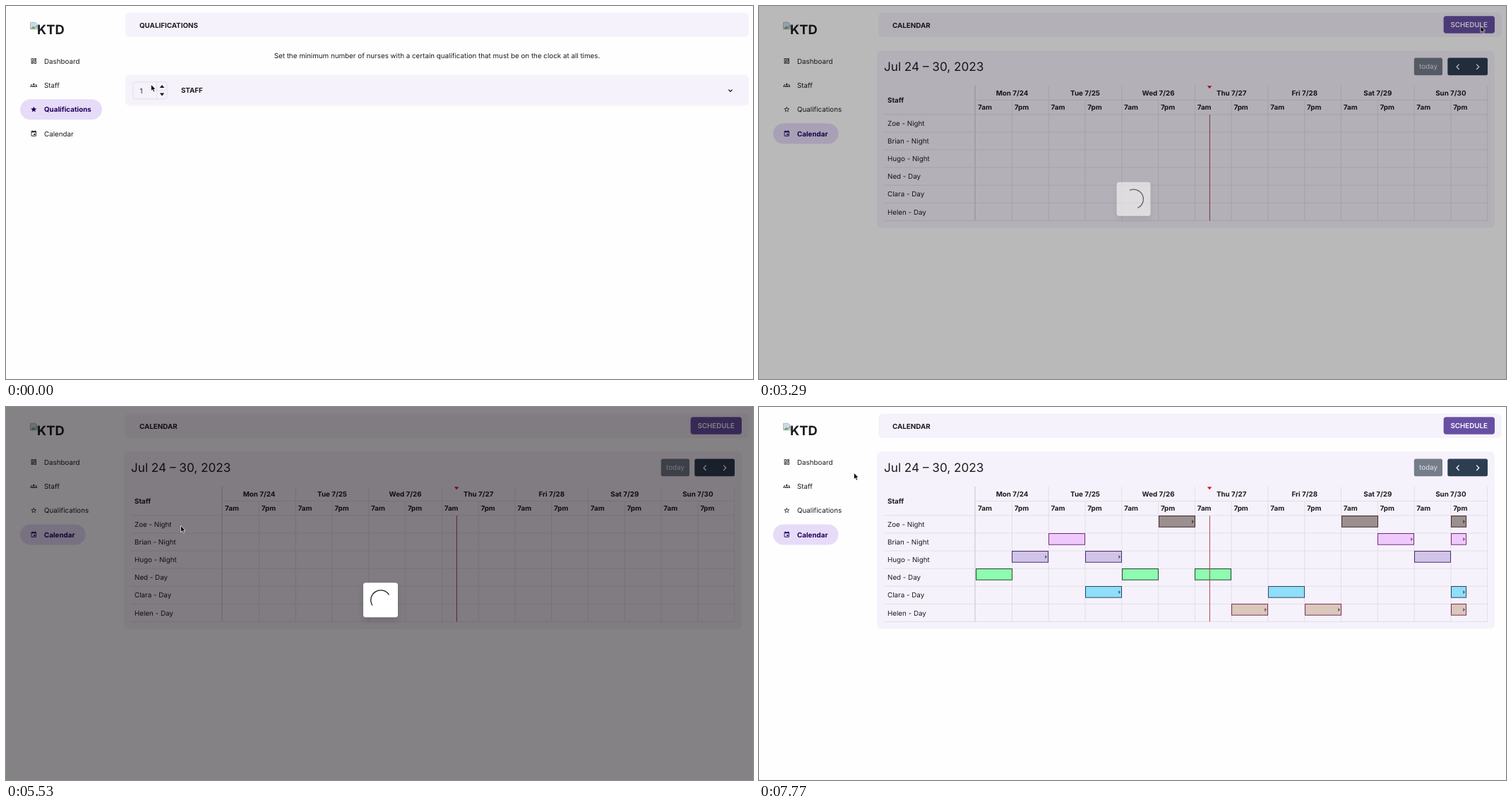
Write an HTML page that moves like this. It is 1058 by 529 pixels and loops after 8 s.

```html
<!DOCTYPE html>
<html lang="en">
<head>
<meta charset="utf-8">
<title>Staff calendar</title>
<style>
  html, body { margin: 0; width: 100%; height: 100%; overflow: hidden; background: #fffeff; }
  svg { display: block; width: 1058px; height: 529px; }
  text { font: 9.8px Inter, sans-serif; fill: #1c1b1f; white-space: pre; text-rendering: geometricPrecision; }
  .bold { font-weight: 700; }
  .semi { font-weight: 600; }
  .mid { text-anchor: middle; }
  .title { font-size: 17.14px; }
  .logo { font-size: 18.4px; font-weight: 700; }
  .active text, .active path { fill: #21005d; }
  .panel { fill: #f6f2fb; }
  .line { stroke: #dddae1; stroke-width: .8; fill: none; }
  #box { filter: drop-shadow(0 4px 4px rgba(0, 0, 0, .13)); }
</style>
</head>
<body>
<svg id="stage" viewBox="0 0 1058 529"></svg>
<script>
const LEFT = 306.7, HALF = 51.78, TOP = 153.8, ROW = 25.1;
const STEP = 70, LOOP = 8000;

const text = (x, y, s, cls = '', extra = '') => `<text x="${x}" y="${y}" class="${cls}" ${extra}>${s}</text>`;
const rect = (x, y, w, h, r, attrs) => `<rect x="${x}" y="${y}" width="${w}" height="${h}" rx="${r}" ${attrs}/>`;
const path = (d, attrs = '') => `<path d="${d}" ${attrs}/>`;
const group = (id, body) => `<g id="${id}">${body}</g>`;
const range = n => [...Array(n).keys()];

const icons = {
  board: 'M19 5v2h-4V5h4M9 5v6H5V5h4m10 8v6h-4v-6h4M9 17v2H5v-2h4M21 3h-8v6h8V3zM11 3H3v10h8V3zm10 8h-8v10h8V11zm-10 4H3v6h8v-6z',
  people: 'M12 6a3 3 0 0 1 0 6a3 3 0 0 1 0-6zM6 18v-1.6c0-4 12-4 12 0V18zm2.3-2h7.4c-1-1.3-6.4-1.3-7.4 0zM4 9a2 2 0 0 1 0 4a2 2 0 0 1 0-4zM20 9a2 2 0 0 1 0 4a2 2 0 0 1 0-4zM0 18v-1.6c0-2 2.5-2.6 5-2.3q-.6 1-.6 3.9zM24 18v-1.6c0-2-2.5-2.6-5-2.3q.6 1 .6 3.9z',
  star: 'M12 17.27 18.18 21l-1.64-7.03L22 9.24l-7.19-.61L12 2 9.19 8.63 2 9.24l5.46 4.73L5.82 21z',
  starHole: 'M12 15.4l-3.76 2.27 1-4.28-3.32-2.88 4.38-.38L12 6.1l1.71 4.04 4.38.38-3.32 2.88 1 4.28z',
  event: 'M17 12h-5v5h5v-5zM16 1v2H8V1H6v2H5c-1.1 0-2 .9-2 2v14c0 1.1.9 2 2 2h14c1.1 0 2-.9 2-2V5c0-1.1-.9-2-2-2h-1V1h-2zm3 18H5V8h14v11z'
};

function navItem(y, label, icon, pill) {
  const back = pill ? rect(20, y - 14.5, pill, 29, 14.5, 'fill="#e6dcf8"') : '';
  return `<g class="${pill ? 'active' : ''}">${back}` +
    path(icon, `fill="#1c1b1f" fill-rule="evenodd" transform="translate(34.4 ${y - 4.9}) scale(.408)"`) +
    text(54, y + 3.5, label, pill ? 'bold' : '') + '</g>';
}

function sidebar() {
  return path('M34.5 23.2h7l3 3v6.6h-10z', 'fill="#cbd9f0" stroke="#a9a9a9" stroke-width=".8"') +
    path('M35 32.4l3.6-4 2.2 2 3.2-3.4v2l-4 3.4z', 'fill="#6fa85c"') +
    text(44, 40.3, 'KTD', 'logo') +
    navItem(78, 'Dashboard', icons.board) + navItem(112.3, 'Staff', icons.people);
}

function qualifications() {
  return navItem(146.7, 'Qualifications', icons.star, 116) + navItem(181, 'Calendar', icons.event) +
    text(189, 30.8, 'QUALIFICATIONS', 'bold') +
    text(610.5, 74.1, 'Set the minimum number of nurses with a certain qualification that must be on the clock at all times.', 'mid') +
    rect(169, 97.5, 883, 44, 6, 'class="panel"') +
    rect(180, 107.8, 48, 24, 3, 'class="line"') +
    path('M213.5 108v24M213.5 120h14.5', 'class="line"') +
    text(189.5, 123.5, '1') +
    path('M217.7 116l3.3-4 3.3 4zM217.7 123.6l3.3 4 3.3-4z', 'fill="#1c1b1f"') +
    text(248, 123.3, 'STAFF', 'bold') +
    path('M1023.3 118.6l2.7 2.7 2.7-2.7', 'fill="none" stroke="#1c1b1f" stroke-width="1.3"');
}

function calendarHeader() {
  return navItem(146.7, 'Qualifications', icons.star + icons.starHole) +
    navItem(181, 'Calendar', icons.event, 92.5) +
    text(189, 30.8, 'CALENDAR', 'bold') +
    rect(969.6, 14.2, 72.4, 24.5, 3.7, 'fill="#6750a4"') +
    text(1005.7, 30, 'SCHEDULE', 'semi mid', 'style="fill:#fff"');
}

const staff = [
  { name: 'Zoe - Night', fill: '#9b8f90', edge: '#44292f', slots: [5, 10, 13], arrows: [5, 13] },
  { name: 'Brian - Night', fill: '#f0c9fc', edge: '#79287f', slots: [2, 11, 13], arrows: [11, 13] },
  { name: 'Hugo - Night', fill: '#d1c4e9', edge: '#4d2a6e', slots: [1, 3, 12], arrows: [1, 3] },
  { name: 'Ned - Day', fill: '#8dfbb0', edge: '#2b4636', slots: [0, 4, 6], arrows: [] },
  { name: 'Clara - Day', fill: '#8fdefa', edge: '#2f4668', slots: [3, 8, 13], arrows: [3, 13] },
  { name: 'Helen - Day', fill: '#d9c8bb', edge: '#85295f', slots: [7, 9, 13], arrows: [7, 9, 13] }
];

function calendar() {
  const bottom = TOP + 6 * ROW;
  const grid = range(14).map(i => `M${LEFT + HALF * (i + 1)} ${i % 2 ? 113 : 133.5}V${bottom}`).join('') +
    range(7).map(i => `M177 ${TOP + i * ROW}H1032`).join('') + 'M307 133.5H1032';
  const days = ['Mon', 'Tue', 'Wed', 'Thu', 'Fri', 'Sat', 'Sun'].map((day, i) => {
    const x = LEFT + 2 * HALF * i;
    return text(x + HALF, 126.8, `${day} 7/${24 + i}`, 'bold mid') +
      text(x + 3.3, 147.2, '7am', 'bold') + text(x + HALF + 3.3, 147.2, '7pm', 'bold');
  }).join('');
  return rect(167, 63.3, 875, 251.5, 6, 'class="panel"') +
    text(177, 92.3, 'Jul 24 – 30, 2023', 'title') +
    rect(927.8, 73.6, 40.2, 24.7, 2.5, 'fill="#747d89"') +
    text(948, 89.3, 'today', 'mid', 'style="fill:#e6e4ea"') +
    rect(975.3, 73.6, 56.7, 24.7, 2.5, 'fill="#2c3e50"') +
    path('M991.6 82.6l-3.5 3.7 3.5 3.7M1016.2 82.6l3.5 3.7-3.5 3.7', 'fill="none" stroke="#fff" stroke-width="1.3"') +
    path(grid, 'class="line"') +
    path(`M306 113V${bottom}`, 'stroke="#dedae2" stroke-width="2"') +
    text(182, 136.8, 'Staff', 'bold') + days +
    staff.map((s, i) => text(182, (170 + i * ROW).toFixed(1), s.name)).join('');
}

function shifts() {
  return staff.map((s, row) => s.slots.map(slot => {
    const x = Math.round(LEFT + slot * HALF) + .5, y = Math.round(TOP + row * ROW) + .5;
    const w = slot === 13 ? 21 : 51;
    const arrow = s.arrows.includes(slot) ? path(`M${x + w - 4.2} ${y + 5.4}l2.8 2.7-2.8 2.7z`, 'fill="#000" opacity=".55"') : '';
    return rect(x, y, w, 15.7, 0, `fill="${s.fill}" stroke="${s.edge}"`) + arrow;
  }).join('')).join('');
}

const nowMarker = path('M634.9 113.3h6.4l-3.2 4z', 'fill="#e0141e"') +
  path('M638.4 154V304.5', 'stroke="#b1454b"');

const modal = rect(506, 249.3, 49, 49, 3.6, 'fill="#fff"') +
  path('M-9.9 -9.9A14 14 0 0 1 9.9 9.9', 'id="spinner" fill="none" stroke="#1a202c" stroke-width="1.3"');

const cursor = path('M0 0V9l2-1.9 1.5 3.3 1.6-.7-1.4-3.2h2.8z', 'id="arrow" fill="#000" stroke="#fff" stroke-width=".7"') +
  path('M-1 .8q1-1.3 2 0v3q3.6-.1 3.8 1.8v2.2q-.4 1.2-1 3h-4.6l-2.7-3.8q-.3-1.6 1.2-1l1.3 1z', 'id="hand" fill="#fff" stroke="#111" stroke-width=".9"');

document.getElementById('stage').innerHTML =
  rect(169, 9.5, 883, 34.5, 6, 'class="panel"') + sidebar() +
  group('formPage', qualifications()) + group('header', calendarHeader()) +
  group('calendar', calendar() + group('shifts', shifts()) + nowMarker) +
  group('shade', rect(0, 0, 1058, 529, 0, 'fill="#060006" fill-opacity=".49"')) +
  group('box', modal) + group('cursor', cursor);

const $ = id => document.getElementById(id);
const show = (id, on) => $(id).setAttribute('display', on ? 'inline' : 'none');

// Pointer stops: time, x, y.
const stops = [
  [210, 205.5, 111.5], [630, 81, 179], [1120, 81, 179], [1260, 46, 185], [1610, 46, 185],
  [1960, 799, 145], [2030, 799, 145], [2240, 981, 66], [2380, 981, 66], [2590, 1022, 28.5],
  [3990, 1022, 28.5], [4060, 1006, 28.5], [4480, 1006, 28.5], [4900, 638, 125], [5180, 247.5, 168.5],
  [5600, 247.5, 168.5], [5740, 120, 89], [5810, 120, 89], [5950, 134.5, 93.5], [LOOP, 134.5, 93.5]
];

function pointerAt(t) {
  const i = stops.findIndex(s => s[0] >= t);
  if (i === 0) return stops[0].slice(1);
  const [t0, x0, y0] = stops[i - 1], [t1, x1, y1] = stops[i];
  const p = (t - t0) / (t1 - t0), e = p * p * (3 - 2 * p);
  return [x0 + (x1 - x0) * e, y0 + (y1 - y0) * e];
}

function shadeAt(t) {
  if (t < 3290 || t >= 7770) return 0;
  return t < 7700 ? 1 - .44 * .23 ** ((t - 3290) / STEP) : .4;
}

function draw(ms) {
  const t = Math.floor(ms % LOOP / STEP) * STEP;
  show('formPage', t < 1540);
  show('header', t >= 1540);
  show('calendar', t >= 1680);
  show('shifts', t >= 7700);

  const shade = shadeAt(t);
  $('shade').setAttribute('opacity', shade);
  $('box').setAttribute('opacity', shade);
  const size = .95 + .05 * shade;
  $('box').setAttribute('transform', `translate(530.5 273.8) scale(${size}) translate(-530.5 -273.8)`);
  $('spinner').setAttribute('transform', `translate(530.7 273.9) rotate(${74 + (t - 3360) / 474 * 360})`);

  const [x, y] = pointerAt(t);
  const hand = (t >= 560 && t < 1680) || (t >= 2590 && t < 3290);
  show('hand', hand);
  show('arrow', !hand);
  $('cursor').setAttribute('transform', `translate(${x} ${y})`);
}

(function tick() {
  draw(performance.now());
  requestAnimationFrame(tick);
})();
</script>
</body>
</html>
```
